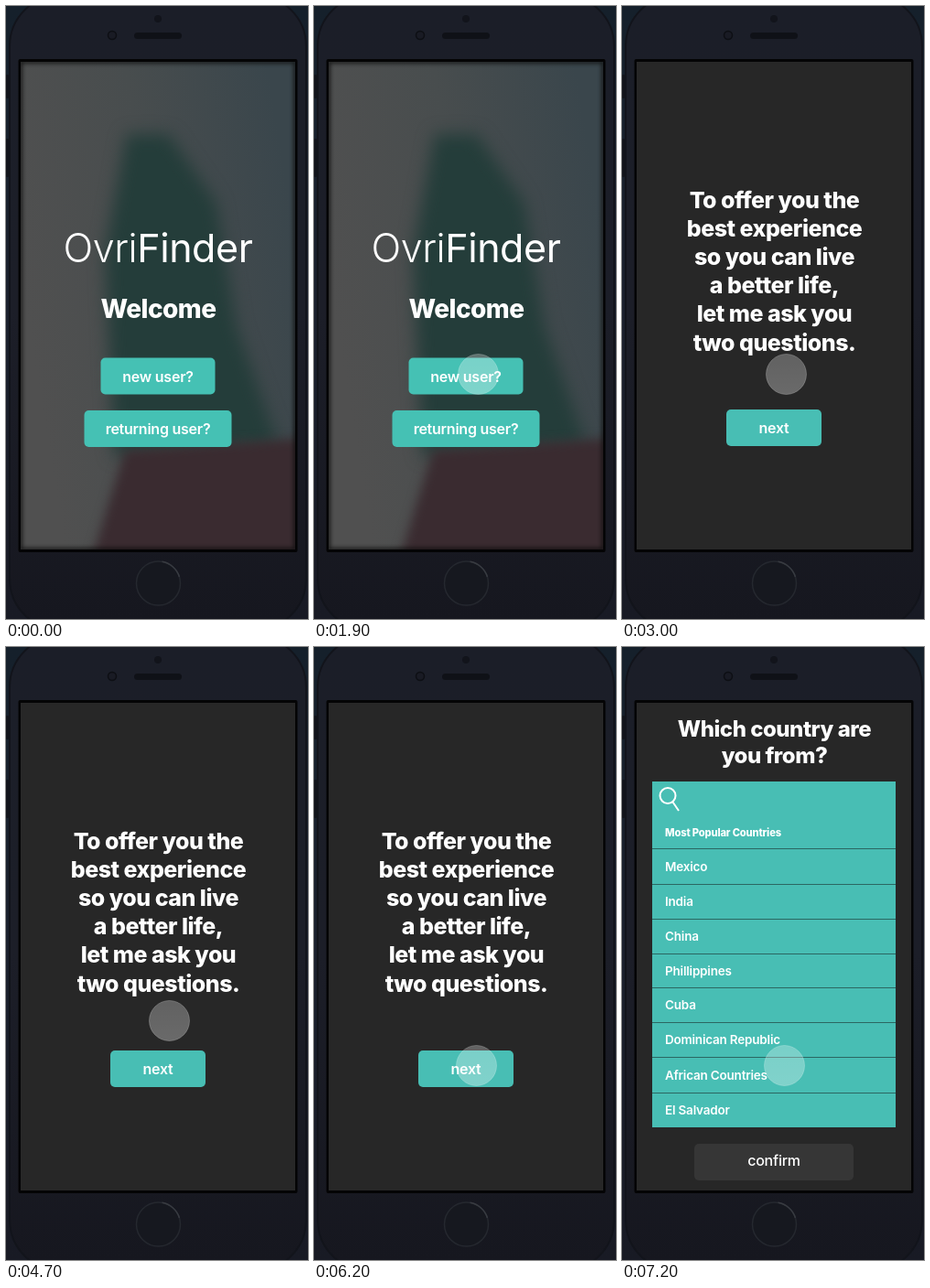
Animation of 330 by 670 pixels, one loop 7.3 s. Source, as an HTML page with a canvas:

```html
<!DOCTYPE html>
<html lang="en">
<head>
<meta charset="utf-8">
<title>Onboarding</title>
<style>
html, body { margin: 0; width: 100%; height: 100%; overflow: hidden; background: #171b25; }
canvas { display: block; }
</style>
</head>
<body>
<canvas id="stage" width="330" height="670"></canvas>
<script>
const W = 330, H = 670, LOOP = 7300, STEP = 100, MID = 166;
const SCREEN = { x: 16, y: 61, w: 300, h: 533 };
const TEAL = '#48beb4', DARK = '#272727';
const stage = document.getElementById('stage').getContext('2d');

function layer(paint) {
  const canvas = document.createElement('canvas');
  canvas.width = W;
  canvas.height = H;
  paint(canvas.getContext('2d'));
  return canvas;
}

function setFont(c, weight, size, tracking) {
  c.font = `${weight} ${size}px Inter, sans-serif`;
  c.letterSpacing = `${size * tracking}px`;
}

function text(c, str, x, y, weight, size, { align = 'center', tracking = -0.015 } = {}) {
  setFont(c, weight, size, tracking);
  c.textAlign = align;
  c.fillStyle = '#fff';
  c.fillText(str, x, y);
}

function heading(c, str, y, size) {
  text(c, str, MID + 0.5, y, 800, size, { tracking: -0.02 });
}

function box(c, x, y, w, h, r, fill) {
  c.beginPath();
  c.roundRect(x, y, w, h, r);
  c.fillStyle = fill;
  c.fill();
}

function disc(c, x, y, r, fill, stroke, width = 1) {
  c.beginPath();
  c.arc(x, y, r, 0, Math.PI * 2);
  c.fillStyle = fill;
  c.fill();
  if (stroke) {
    c.strokeStyle = stroke;
    c.lineWidth = width;
    c.stroke();
  }
}

function polygon(c, points, fill) {
  c.beginPath();
  points.forEach(([x, y]) => c.lineTo(x, y));
  c.closePath();
  c.fillStyle = fill;
  c.fill();
}

function gradient(c, x0, y0, x1, y1, colors) {
  const g = c.createLinearGradient(x0, y0, x1, y1);
  colors.forEach((color, i) => g.addColorStop(i / (colors.length - 1), color));
  return g;
}

function clipScreen(c) {
  c.beginPath();
  c.rect(SCREEN.x, SCREEN.y, SCREEN.w, SCREEN.h);
  c.clip();
}

function button(c, label, x, y, w, h, baseline, fill = TEAL, weight = 600) {
  box(c, x, y, w, h, 5, fill);
  text(c, label, x + w / 2, baseline, weight, 16);
}

const phone = layer(c => {
  c.fillStyle = gradient(c, 0, 0, 0, H, ['#15202b', '#1b202d', '#181a24']);
  c.fillRect(0, 0, W, H);

  box(c, 0, 75, 3, 26, 1, '#12141b');
  box(c, 0, 145, 3, 42, 1, '#12141b');

  box(c, 4, -12, 324, 694, 56, gradient(c, 0, 0, 0, H, ['#1b1e28', '#1c1e28', '#16171f']));
  c.strokeStyle = '#12141b';
  c.lineWidth = 2;
  c.stroke();

  box(c, 140, 29, 52, 7, 3.5, '#0f1117');
  disc(c, 166, 14, 4, '#12141b');
  disc(c, 116, 32, 4.5, '#191b24', '#0d0f14', 1.5);

  disc(c, 166.5, 631, 24, '#16181f', '#25282f', 1.5);
  c.strokeStyle = '#383b41';
  c.beginPath();
  c.arc(166.5, 631, 24, -1.4, -0.3);
  c.stroke();

  box(c, 13.5, 58, 305, 539, 2, '#040405');
});

const welcome = layer(c => {
  c.save();
  clipScreen(c);
  c.fillStyle = gradient(c, 16, 300, 316, 250, ['#505050', '#484d4e', '#3a464c']);
  c.fillRect(0, 0, W, H);

  // Soft backdrop in the tones of the photograph
  c.filter = 'blur(9px)';
  polygon(c, [[132, 140], [178, 140], [230, 215], [252, 350], [298, 480], [118, 492], [108, 270]], '#243d3a');
  c.filter = 'blur(6px)';
  polygon(c, [[130, 486], [330, 472], [330, 610], [92, 610]], '#3a2b30');

  c.filter = 'blur(2px)';
  c.strokeStyle = 'rgba(12,12,12,.8)';
  c.lineWidth = 4;
  c.strokeRect(SCREEN.x, SCREEN.y, SCREEN.w, SCREEN.h);
  c.restore();

  const parts = [['Ovri', 300], ['Finder', 400]];
  const size = 43, tracking = -0.01;
  const widths = parts.map(([str, weight]) => {
    setFont(c, weight, size, tracking);
    return c.measureText(str).width;
  });
  let x = MID - (widths[0] + widths[1]) / 2;
  parts.forEach(([str, weight], i) => {
    text(c, str, x, 280, weight, size, { align: 'left', tracking });
    x += widths[i];
  });

  heading(c, 'Welcome', 341, 28);
  button(c, 'new user?', 103.5, 384.5, 125, 40, 411, '#45c1b4');
  button(c, 'returning user?', 85.5, 442, 161, 40, 468, '#45c1b4');
});

const intro = layer(c => {
  c.fillStyle = DARK;
  c.fillRect(SCREEN.x, SCREEN.y, SCREEN.w, SCREEN.h);
  const lines = ['To offer you the', 'best experience', 'so you can live',
    'a better life,', 'let me ask you', 'two questions.'];
  lines.forEach((line, i) => heading(c, line, 221 + i * 31.1, 25));
  button(c, 'next', 114, 441, 104, 40, 467);
});

const countries = layer(c => {
  c.fillStyle = DARK;
  c.fillRect(SCREEN.x, SCREEN.y, SCREEN.w, SCREEN.h);
  heading(c, 'Which country are', 97.5, 24);
  heading(c, 'you from?', 126.5, 24);

  c.fillStyle = TEAL;
  c.fillRect(33, 147, 266, 378);

  c.strokeStyle = '#fff';
  c.lineWidth = 2;
  c.beginPath();
  c.arc(50, 162.5, 8.5, 0, Math.PI * 2);
  c.moveTo(55.5, 169.5);
  c.lineTo(62, 179);
  c.stroke();

  text(c, 'Most Popular Countries', 47, 207, 800, 11.2, { align: 'left' });
  const rows = [['Mexico', 220], ['India', 259], ['China', 297], ['Phillippines', 335], ['Cuba', 372],
    ['Dominican Republic', 410], ['African Countries', 448], ['El Salvador', 487]];
  rows.forEach(([name, top], i) => {
    const bottom = i + 1 < rows.length ? rows[i + 1][1] : 525;
    c.fillStyle = '#2b6762';
    c.fillRect(33, top, 266, 1);
    text(c, name, 47, (top + bottom) / 2 + 5, 600, 13.5, { align: 'left' });
  });
  button(c, 'confirm', 79, 543, 174, 40, 567, '#363636', 500);
});

// Pointer path: [time, x, y]
const path = [
  [0, 360, 704], [500, 352, 700], [600, 328, 676], [700, 292, 624], [800, 246, 556],
  [900, 198.5, 478], [1000, 189, 443], [1100, 184, 422], [1300, 180.5, 405], [1600, 179.5, 402.5],
  [4000, 179.5, 402.5], [4200, 179, 403.5], [4600, 179, 403.5], [4700, 178.5, 408.5],
  [4900, 178, 425], [5100, 177.5, 442], [5300, 177.5, 453], [5500, 177.5, 457.5], [LOOP, 177.5, 457.5]
];

function pointerAt(t) {
  const i = path.findIndex(key => key[0] > t);
  const [t0, x0, y0] = path[i - 1], [t1, x1, y1] = path[i];
  const k = (t - t0) / (t1 - t0);
  return [x0 + (x1 - x0) * k, y0 + (y1 - y0) * k];
}

function drawPointer(x, y) {
  const r = 22;
  const fill = gradient(stage, x, y - r, x, y + r, ['rgba(255,255,255,.27)', 'rgba(255,255,255,.31)']);
  disc(stage, x, y, r, fill, 'rgba(255,255,255,.22)');
}

function show(screen, alpha) {
  if (alpha <= 0) return;
  stage.globalAlpha = alpha;
  stage.drawImage(screen, 0, 0);
  stage.globalAlpha = 1;
}

function dissolve(t, start) {
  const k = Math.min(1, Math.max(0, (t - start) / 300));
  return 1 - (1 - k) ** 1.4;
}

function draw(t) {
  show(phone, 1);
  show(welcome, 1);
  show(intro, dissolve(t, 1900));
  show(countries, dissolve(t, 6200));
  drawPointer(...pointerAt(t));
}

const origin = performance.now();
function tick() {
  const elapsed = Math.max(0, performance.now() - origin);
  draw(Math.floor((elapsed % LOOP) / STEP) * STEP);
  requestAnimationFrame(tick);
}
tick();
</script>
</body>
</html>
```
